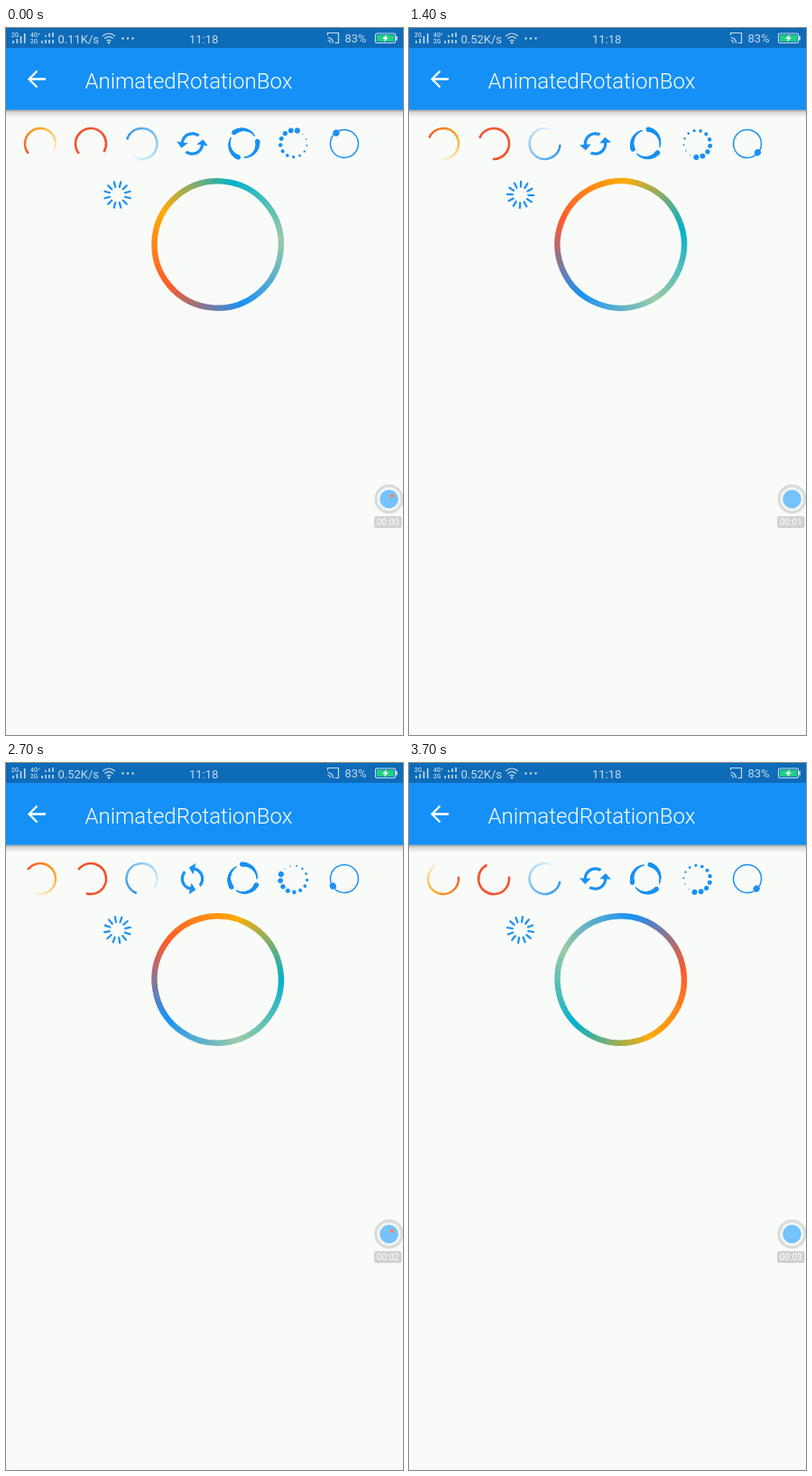
These frames come from a looping animation (440x782 px, 3.8 s). An HTML page with a canvas:

```html
<!DOCTYPE html>
<html lang="en">
<head>
<meta charset="utf-8">
<title>AnimatedRotationBox</title>
<style>
  html, body { margin: 0; width: 100%; height: 100%; overflow: hidden; background: #f9fbf8; }
  svg, canvas { position: absolute; left: 0; top: 0; }
  text { font-family: Roboto, "Open Sans", sans-serif; }
  .status { fill: #c5dcf0; font-size: 13px; }
  .tiny { fill: #c5dcf0; font-size: 6.5px; font-weight: 500; }
</style>
</head>
<body>
<svg width="440" height="782" viewBox="0 0 440 782">
  <defs>
    <linearGradient id="shade" x2="0" y2="1">
      <stop stop-color="#000" stop-opacity=".38"/>
      <stop offset=".4" stop-color="#000" stop-opacity=".13"/>
      <stop offset="1" stop-color="#000" stop-opacity="0"/>
    </linearGradient>
  </defs>
  <rect y="90" width="440" height="9" fill="url(#shade)"/>
  <rect width="440" height="90.5" fill="#1590f6"/>
  <rect width="440" height="22" fill="#0e6bb8"/>

  <!-- Status bar -->
  <text class="tiny" x="6" y="10">2G</text>
  <text class="tiny" x="27" y="10">4G⁺</text>
  <text class="tiny" x="27" y="17">2G</text>
  <g stroke="#c5dcf0" stroke-width="1.6">
    <path d="M8 17v-3M12.3 17v-5M16.5 17V9M20.7 17V6"/>
    <path d="M40 17v-3M44 17v-4M48 17v-4M52 17v-4M44 10V8M48 10V6M52 10V5"/>
  </g>
  <text class="status" id="speed" x="57.5" y="16.5">0.11K/s</text>
  <g fill="none" stroke="#c5dcf0" stroke-width="1.2">
    <path d="M107 9q7-6 14 0M109.3 11.7q4.700-4 9.400 0M111.600 14.300q2.400-2 4.800 0"/>
    <path d="M356.500 8V5.500H368.500V16.500H364.500M356.500 10.500a6 6 0 0 1 6 6M356.500 13.500a3 3 0 0 1 3 3"/>
    <rect x="409.500" y="6" width="22" height="10.500" rx="1.500"/>
  </g>
  <g fill="#c5dcf0">
    <circle cx="114" cy="16.200" r="1.200"/>
    <circle cx="129.500" cy="11.500" r="1.200"/><circle cx="135" cy="11.500" r="1.200"/><circle cx="140.500" cy="11.500" r="1.200"/>
    <rect x="432" y="9" width="1.800" height="4.500"/>
  </g>
  <text class="status" x="203" y="16.500">11:18</text>
  <text class="status" x="375.500" y="16">83%</text>
  <rect x="411" y="7.500" width="19" height="7.500" fill="#20cf85"/>
  <path d="M422 7l-5 5h3l-1 3.500 5-5h-3z" fill="#fff"/>

  <!-- App bar -->
  <path d="M44 56.500H26M34.500 47.500l-9 9 9 9" fill="none" stroke="#fff" stroke-width="2.300"/>
  <text x="87.500" y="66.500" fill="#fff" font-size="24" font-weight="300">AnimatedRotationBox</text>

  <!-- Recorder button -->
  <circle cx="424.500" cy="521" r="16.200" fill="#d9dcd9"/>
  <circle cx="424.500" cy="521" r="13" fill="#f4f6f3"/>
  <circle cx="424.500" cy="521" r="10.300" fill="#76c2fc"/>
  <circle id="lamp" cx="428" cy="517.500" r="2.200" fill="#f5855f"/>
  <rect x="408" y="540" width="30.500" height="13" rx="2.500" fill="#cfd2cf"/>
  <text id="timer" x="423.200" y="550.200" fill="#fff" font-size="10" text-anchor="middle">00:00</text>
</svg>
<canvas width="440" height="782"></canvas>

<script>
const $ = id => document.getElementById(id);
const ctx = document.querySelector('canvas').getContext('2d');
const BLUE = '#1a91f2', TAU = 2 * Math.PI;
const rad = deg => deg * Math.PI / 180;
const syncIcon = new Path2D('M12 4V1L8 5l4 4V6c3.31 0 6 2.69 6 6 0 1.010-.25 1.970-.7 2.800l1.460 1.460C19.540 15.030 20 13.570 20 12c0-4.420-3.580-8-8-8zm0 14c-3.310 0-6-2.690-6-6 0-1.010.25-1.970.7-2.800L5.240 7.740C4.460 8.970 4 10.430 4 12c0 4.420 3.580 8 8 8v3l4-4-4-4v3z');

const pace = [[0, 0], [1, 0], [4, 160], [10, 606], [14, 1172], [21, 2100], [26, 2100], [30, 2540], [37, 3588]];

function appTime(tick) {
  const i = Math.max(1, pace.findIndex(p => p[0] >= tick));
  const [t0, a] = pace[i - 1], [t1, b] = pace[i];
  return a + (b - a) * (tick - t0) / (t1 - t0);
}

// Angles run clockwise from the top
function spin(x, y, deg, draw) {
  ctx.save();
  ctx.translate(x, y);
  ctx.rotate(rad(deg - 90));
  ctx.fillStyle = ctx.strokeStyle = BLUE;
  draw();
  ctx.restore();
}

function ring(r, width, sweep, colors) {
  const g = ctx.createConicGradient(0, 0, 0);
  colors.forEach((c, i) => g.addColorStop(sweep * i / (colors.length - 1), c));
  ctx.strokeStyle = g;
  ctx.lineWidth = width;
  ctx.beginPath();
  ctx.arc(0, 0, r, 0, sweep * TAU);
  ctx.stroke();
}

function dot(r, deg, size) {
  ctx.beginPath();
  ctx.arc(r * Math.cos(rad(deg)), r * Math.sin(rad(deg)), size, 0, TAU);
  ctx.fill();
}

function tails() {
  for (let k = 0; k < 3; k++)
    for (let i = 0; i <= 48; i++) dot(16 - i / 60, k * 120 + i * 2, 2.5 - i / 25);
}

function dots() {
  for (let i = 0; i < 13; i++) dot(15 - i / 24, -i * 360 / 13, 3.1 - i * 0.21);
}

function orbit() {
  ctx.lineWidth = 1.5;
  ctx.beginPath();
  ctx.arc(0, 0, 15.5, 0, TAU);
  ctx.stroke();
  dot(15, 0, 3.6);
}

function spokes() {
  ctx.lineWidth = 2.2;
  ctx.lineCap = 'round';
  for (let i = 0; i < 12; i++) {
    ctx.beginPath();
    ctx.moveTo(8.8, 0);
    ctx.lineTo(14.6, 0);
    ctx.stroke();
    ctx.rotate(TAU / 12);
  }
}

function sync() {
  ctx.rotate(TAU / 4);
  ctx.scale(1.6, 1.6);
  ctx.translate(-12, -12);
  ctx.fill(syncIcon);
}

function frame() {
  const ms = appTime(Math.floor(performance.now() % 3800 / 100));
  const slow = 230 + ms * 0.36, fast = ms * 0.45;

  ctx.clearRect(0, 0, 440, 782);
  spin(38, 128, slow, () => ring(17, 2.4, 0.7, ['#f2552c', '#fba61c', '#fdf3df']));
  spin(94, 128, slow, () => ring(17, 2.6, 0.7, ['#f1532f', '#f1532f']));
  spin(150.5, 128, 285 + fast, () => ring(17, 2.5, 0.8, ['#2c93e6', '#def5fd']));
  spin(206.5, 128, 98 + fast, sync);
  spin(263, 128, 80 + fast, tails);
  spin(319, 128, 15 + fast, dots);
  spin(375, 128, 323 + fast, orbit);
  spin(123.5, 184.5, 15 + fast, spokes);
  spin(234.7, 239.5, slow, () =>
    ring(70.2, 6.4, 1, ['#ff5a2c', '#ffab08', '#04b1cb', '#9acba6', '#1a91f5', '#ff5a2c']));

  const clock = ms + 60;
  $('timer').textContent = '00:0' + Math.floor(clock / 1000);
  $('speed').textContent = clock < 1000 ? '0.11K/s' : '0.52K/s';
  $('lamp').setAttribute('opacity', clock % 2250 < 1150 ? 1 : 0);
  requestAnimationFrame(frame);
}
frame();
</script>
</body>
</html>
```
